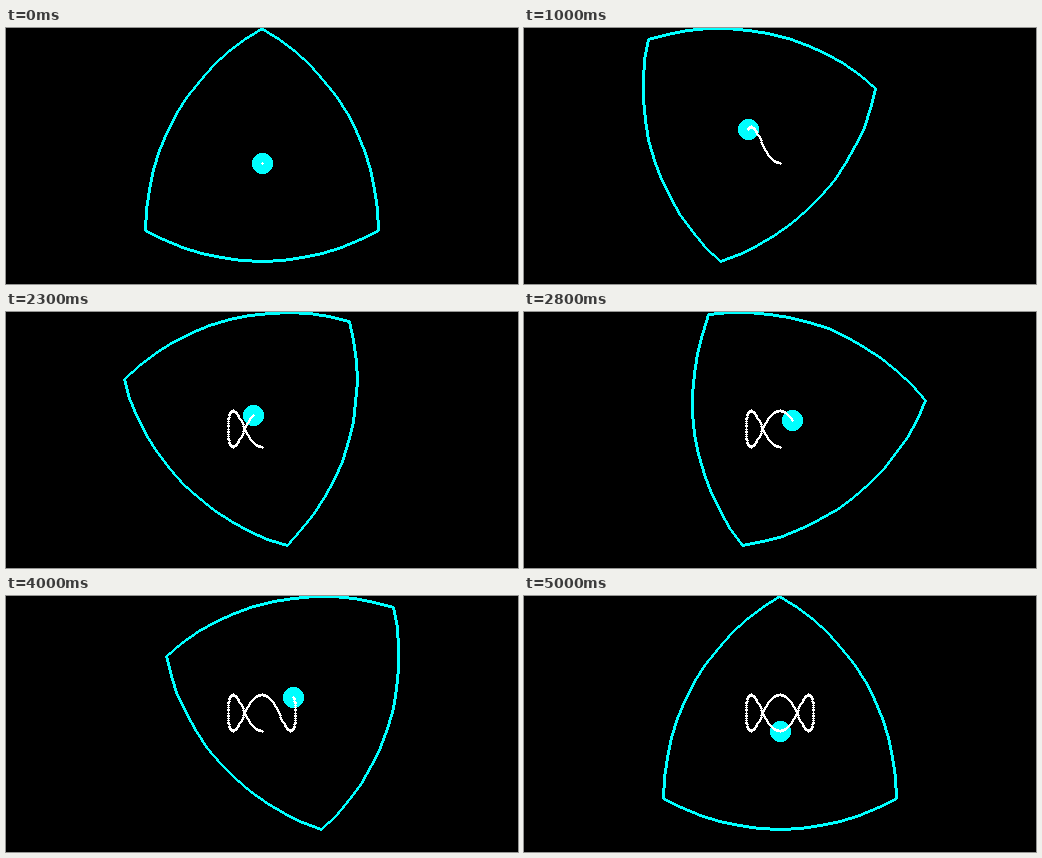
Write an HTML page with a canvas that moves like this. It is 512 px wide and 256 px high and loops after 5.1 s.

```html
<!DOCTYPE html>
<html lang="en">
<head>
<meta charset="utf-8">
<title>Rolling Reuleaux triangle</title>
<style>
  html, body { margin: 0; width: 100%; height: 100%; overflow: hidden; background: #000; }
  canvas { display: block; width: 512px; height: 256px; }
</style>
</head>
<body>
<canvas id="stage" width="512" height="256"></canvas>
<script>
const ctx = document.getElementById("stage").getContext("2d");
const WIDTH = 233.005;                 // constant width of the triangle
const RADIUS = WIDTH / Math.sqrt(3);   // centre to corner
const SWAY = RADIUS / 4;
const STEPS = 50, STEP_MS = 100, DOTS_PER_STEP = 4;
const ARC_SEGMENTS = 12;
const DISC_RADIUS = 10;
const TAU = 2 * Math.PI, THIRD = TAU / 3;

// The shape always touches the lines y = 0 and y = WIDTH.
function centre(angle) {
  const lean = angle - Math.round(angle / THIRD) * THIRD;
  const y = Math.abs(lean) <= TAU / 12
    ? RADIUS * Math.cos(lean)
    : WIDTH - RADIUS * Math.cos(THIRD / 2 - Math.abs(lean));
  return { x: 256 - SWAY * Math.sin(angle), y };
}

const snap = p => ({ x: Math.floor(p.x), y: Math.round(p.y) });

// Three-pixel plus, used as a hard-edged brush.
function stamp({ x, y }) {
  ctx.fillRect(x - 1, y, 3, 1);
  ctx.fillRect(x, y - 1, 1, 3);
}

function line(a, b) {
  const dx = b.x - a.x, dy = b.y - a.y;
  const n = Math.max(Math.abs(dx), Math.abs(dy), 1);
  for (let i = 0; i <= n; i++) {
    stamp({ x: Math.round(a.x + dx * i / n), y: Math.round(a.y + dy * i / n) });
  }
}

// Each side is an arc centred on the opposite corner.
function outline(c, angle) {
  for (let k = 0; k < 3; k++) {
    const turn = angle + k * THIRD;
    const cx = c.x + RADIUS * Math.sin(turn);
    const cy = c.y - RADIUS * Math.cos(turn);
    const arcPoint = i => {
      const a = turn + (i / ARC_SEGMENTS - 0.5) * TAU / 6;
      return snap({ x: cx - WIDTH * Math.sin(a), y: cy + WIDTH * Math.cos(a) });
    };
    for (let i = 0; i < ARC_SEGMENTS; i++) line(arcPoint(i), arcPoint(i + 1));
  }
}

function disc({ x, y }) {
  const limit = DISC_RADIUS * (DISC_RADIUS + 1);
  for (let dy = -DISC_RADIUS; dy <= DISC_RADIUS; dy++) {
    const half = Math.floor(Math.sqrt(limit - dy * dy));
    ctx.fillRect(x - half, y + dy, 2 * half + 1, 1);
  }
}

function draw(step) {
  const angle = step / STEPS * TAU;
  const c = centre(angle);
  ctx.fillStyle = "#000";
  ctx.fillRect(0, 0, 512, 256);
  ctx.fillStyle = "#0ff";
  outline(c, angle);
  disc(snap(c));
  ctx.fillStyle = "#fff";
  for (let i = 0; i <= step * DOTS_PER_STEP; i++) {
    stamp(snap(centre(i / (STEPS * DOTS_PER_STEP) * TAU)));
  }
}

const start = performance.now();
let shown = -1;
function tick() {
  const elapsed = performance.now() - start;
  const step = Math.floor(elapsed / STEP_MS) % (STEPS + 1);
  if (step !== shown) draw(shown = step);
  requestAnimationFrame(tick);
}
tick();
</script>
</body>
</html>
```
